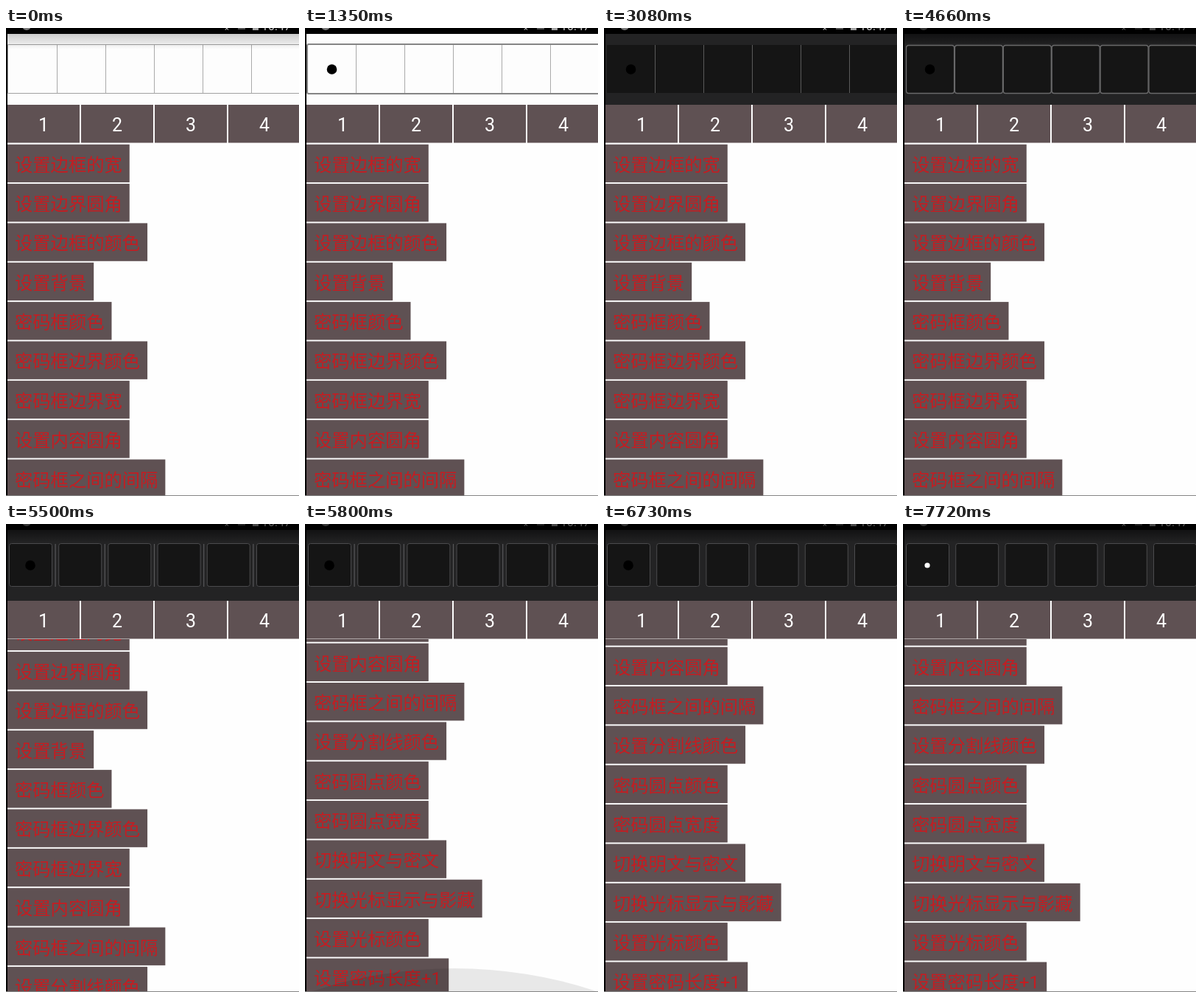
An HTML page with a canvas for the animation above (8 s loop, 398 px wide and 634 px high).

```html
<!DOCTYPE html>
<html lang="zh-CN">
<head>
<meta charset="utf-8">
<style>
html, body { margin: 0; width: 100%; height: 100%; overflow: hidden; background: #fff; }
canvas { display: block; }
</style>
</head>
<body>
<canvas width="398" height="634"></canvas>
<script>
const LOOP = 8000, W = 398, H = 634, LEFT = 2;
const ROW_TOP = 157.7, ROW_PITCH = 53.35, LIST_TOP = 156, TEXT_SIZE = 24.3;
const FONT = 'Roboto, "Noto Sans CJK SC", "Noto Sans CJK", sans-serif';
const BUTTON = '#5f5153', DARK = '#232324', CELL = '#151515';
const labels = ['设置边框的宽', '设置边界圆角', '设置边框的颜色', '设置背景', '密码框颜色',
  '密码框边界颜色', '密码框边界宽', '设置内容圆角', '密码框之间的间隔', '设置分割线颜色',
  '密码圆点颜色', '密码圆点宽度', '切换明文与密文', '切换光标显示与影藏', '设置光标颜色', '设置密码长度+1'];

// When each setting takes effect, in ms
const at = { dot: 150, borderWidth: 950, borderRadius: 1350, borderColor: 2030, background: 2490,
  cellColor: 3080, shade: 3450, cellLine: 3600, cellLineWidth: 4130, cellRadius: 4660,
  spacing: 5220, divider: 6730, dotColor: 7190, dotSize: 7720 };
const scrollSteps = [[0, 0], [5500, 38], [5650, 185], [5800, 369.5], [6050, 364.5]];
const glowSteps = [[0, 0], [5800, 32], [5920, 54], [6050, 0]];

const c = document.querySelector('canvas').getContext('2d');
const stepAt = (steps, t) => steps.filter(([start]) => t >= start).pop()[1];

function rect(x, y, w, h, color) {
  c.fillStyle = color;
  c.fillRect(x, y, w, h);
}

function roundRect(x, y, w, h, r, fill, stroke, lineWidth) {
  c.beginPath();
  c.roundRect(x, y, w, h, r);
  if (fill) { c.fillStyle = fill; c.fill(); }
  if (stroke) { c.strokeStyle = stroke; c.lineWidth = lineWidth; c.stroke(); }
}

function disc(x, y, r, color) {
  c.fillStyle = color;
  c.beginPath();
  c.arc(x, y, r, 0, 7);
  c.fill();
}

function text(str, x, y, size, color, align = 'left') {
  c.font = `${size}px ${FONT}`;
  c.textAlign = align;
  c.fillStyle = color;
  c.fillText(str, x, y);
}

function drawList(scroll, glow) {
  labels.forEach((label, i) => {
    const y = ROW_TOP + i * ROW_PITCH - scroll;
    c.font = `${TEXT_SIZE}px ${FONT}`;
    rect(LEFT, y, c.measureText(label).width + 20, 51.4, BUTTON);
    text(label, 12, y + 36, TEXT_SIZE, '#c41d22');
  });
  if (glow) {
    c.fillStyle = 'rgba(0,0,0,.085)';
    c.beginPath();
    c.ellipse(203, H - glow + 400, 500, 400, 0, 0, 7);
    c.fill();
  }
}

function drawStatusBar(dim) {
  rect(0, 0, W, 8, '#000');
  c.globalAlpha = dim ? 0.35 : 0.8;
  disc(28, -3, 6, '#999');
  text('10:47', 367, 3, 16, '#fff', 'center');
  text('×', 300, 4, 11, '#fff', 'center');
  rect(315, 0, 10, 2, '#666');
  rect(335, 0, 8, 3, '#ccc');
  c.globalAlpha = 1;
}

function drawShade(alpha, end) {
  const shade = c.createLinearGradient(0, 8, 0, end);
  shade.addColorStop(0, `rgba(0,0,0,${alpha})`);
  shade.addColorStop(1, 'rgba(0,0,0,0)');
  rect(LEFT, 8, W, end - 8, shade);
}

function drawCells(on) {
  const fill = on('cellColor') ? CELL : '#fdfdfd';
  if (on('spacing')) {
    for (let i = 0; i < 6; i++) {
      const x = 4.5 + i * 67.2;
      roundRect(x, 26.5, 58, 58, 3, fill, '#4b4b4d', 1);
      if (i && !on('divider')) rect(x - 5.2, 27, 1.2, 58, '#58585a');
    }
    return;
  }
  const border = on('borderColor') ? DARK : on('borderWidth') ? '#858585' : '#a2a2a2';
  const width = on('borderWidth') ? 2 : 1;
  const inset = LEFT + width / 2;
  roundRect(inset, 21 + inset - LEFT + (width < 2 ? 1 : 0), 399, width < 2 ? 66 : 67,
    on('borderRadius') ? 2 : 0, fill, border, width);
  if (on('cellLine')) {
    const lineWidth = on('cellLineWidth') ? 1.3 : 1;
    for (let i = 0; i < 6; i++)
      roundRect(4.5 + i * 65.9, 23.5, 65, 65, on('cellRadius') ? 3 : 0, null, '#69696a', lineWidth);
  } else {
    const line = on('cellColor') ? '#5a5a5a' : '#aaa';
    for (let i = 1; i < 6; i++) rect(3 + i * 66, 23, 1, 65, line);
  }
}

function draw(t) {
  const on = name => t >= at[name];
  rect(0, 0, W, H, '#fefefe');
  drawList(stepAt(scrollSteps, t), stepAt(glowSteps, t));

  rect(LEFT, 0, W, LIST_TOP, on('background') ? DARK : '#fdfdfd');
  drawStatusBar(on('shade'));
  if (on('shade')) drawShade(0.5, 25);
  drawCells(on);
  if (!on('dot')) drawShade(0.2, 29);
  if (on('dot'))
    disc(on('spacing') ? 33 : 36.5, 56, on('dotSize') ? 3.6 : 6.8, on('dotColor') ? '#fff' : '#000');

  rect(LEFT, 104, W, 52, '#fefefe');
  for (let i = 0; i < 4; i++) {
    rect(LEFT + i * 100, 104, 98, 51.5, BUTTON);
    text(i + 1, 51 + i * 100, 140, 25, '#fff', 'center');
  }
  rect(0, 0, LEFT, H, '#000');
  rect(0, H - 1, W, 1, '#858585');
}

const start = performance.now();
function frame() {
  draw((performance.now() - start) % LOOP);
  requestAnimationFrame(frame);
}
frame();
</script>
</body>
</html>
```
